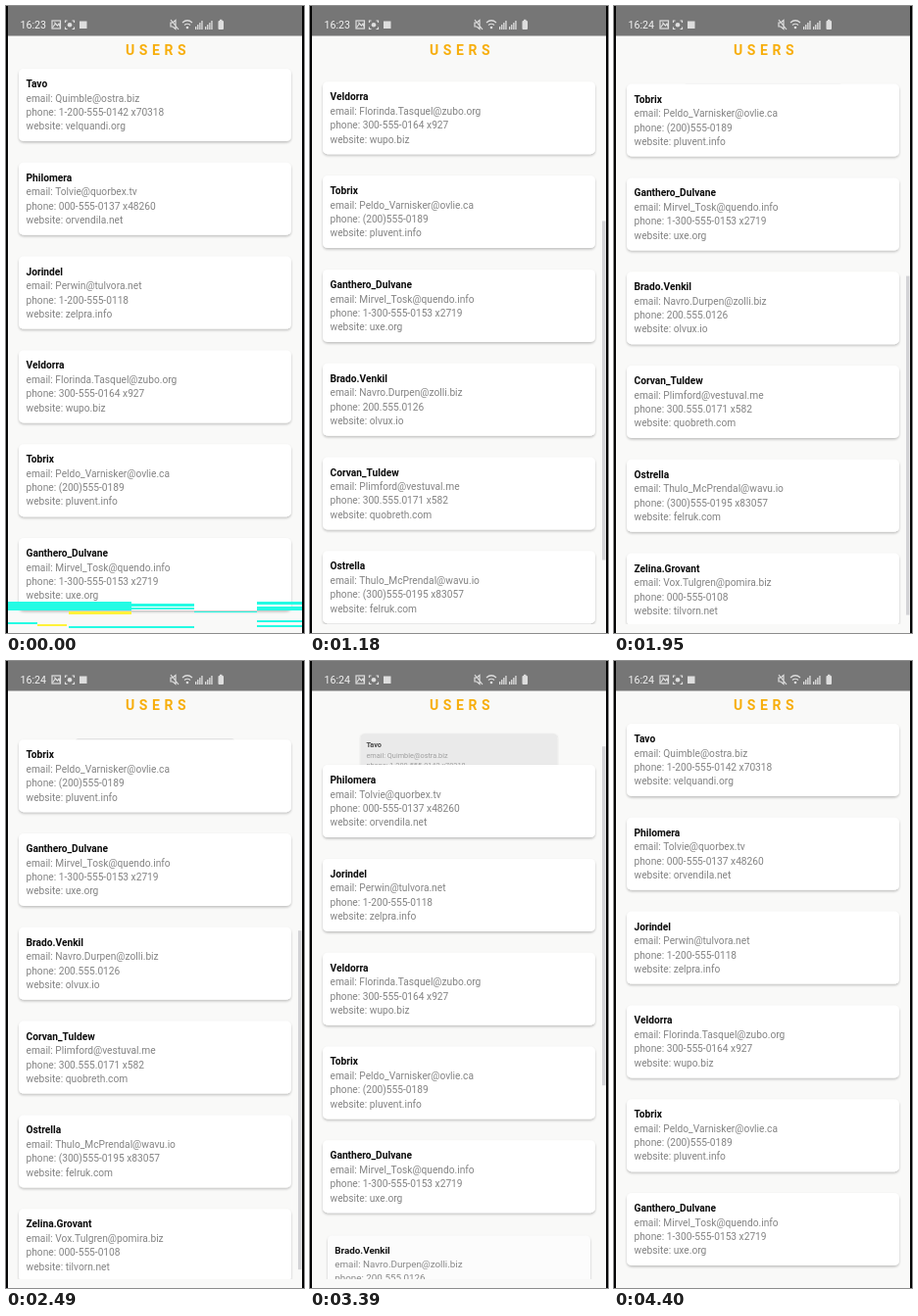
These frames come from a looping animation (304 by 640 pixels, 4430 ms). An HTML page:

```html
<!DOCTYPE html>
<html lang="en">
<head>
<meta charset="utf-8">
<title>Users</title>
<style>
  html, body { margin: 0; width: 100%; height: 100%; overflow: hidden; background: #f9f9f8; }
  svg { display: block; width: 100vw; height: 100vh; }
  text { font-family: Roboto, sans-serif; }
  .name { font-size: 10.2px; font-weight: 700; fill: #0b0b0b; }
  .info { font-size: 10.2px; fill: #838383; }
  .title { font-size: 14px; font-weight: 700; letter-spacing: 4.6px; fill: #f7ae0c; }
  .clock { font-size: 10.6px; fill: #f2f2f2; }
</style>
</head>
<body>
<svg viewBox="0 0 304 640" preserveAspectRatio="none">
  <defs>
    <filter id="shade" x="-5%" y="-10%" width="110%" height="130%">
      <feDropShadow dx="0" dy="1.5" stdDeviation="1.2" flood-color="#000" flood-opacity=".24"/>
    </filter>
    <clipPath id="list"><rect x="2" y="56" width="300" height="575"/></clipPath>
  </defs>
  <rect width="304" height="640" fill="#f9f9f8"/>
  <g id="cards" clip-path="url(#list)"></g>
  <rect id="thumb" x="298" width="3.5" height="346" fill="#d3d3d6"/>
  <text class="title" x="122" y="50">USERS</text>

  <rect width="304" height="30.5" fill="#767676"/>
  <text id="clock" class="clock" x="14.5" y="23"></text>
  <g fill="none" stroke="#dedede" stroke-width="1.2">
    <rect x="47" y="15" width="8.5" height="8"/>
    <path d="M47.5 22l3-4 2 2 1.500-2 1.500 4M49 17h1.500"/>
    <path d="M62.500 15h-2v2M67.500 15h2v2M62.500 23.500h-2v-2M67.500 23.500h2v-2"/>
    <path d="M168 17h2l3-2.500v9l-3-2.500h-2zM168 14l8 10"/>
    <path d="M180 17q5-4.500 10 0M182 19.500q3-2.500 6 0"/>
  </g>
  <g fill="#dedede">
    <circle cx="65" cy="19.200" r="2.300"/>
    <rect x="75" y="15.500" width="7.500" height="7.500"/>
    <circle cx="185" cy="22" r="1.300"/>
    <g id="bars"></g>
    <rect x="216.500" y="15" width="5.500" height="9" rx="1"/>
    <rect x="218" y="13.800" width="2.500" height="2"/>
  </g>
  <g id="glitch">
    <path fill="#25fbe4" d="M0 608h128v9H0zM128 610h64v3h-64zM128 614h64v2h-64zM192 618h64v1h-64zM256 608h48v3h-48zM256 613h48v4h-48zM0 629h32v2H0zM64 633h128v2H64zM256 627h48v2h-48zM256 632h48v2h-48z"/>
    <path fill="#fff23a" d="M64 618h64v3H64zM32 631h30v2H32z"/>
  </g>
  <path d="M0 0h2v640H0zM302 0h2v640h-2z" fill="#050505"/>
</svg>
<script>
const LOOP = 4430, PITCH = 95.8, TOP = 101, BOTTOM = 615.2;
const users = [
  ["Tavo", "Quimble@ostra.biz", "1-200-555-0142 x70318", "velquandi.org"],
  ["Philomera", "Tolvie@quorbex.tv", "000-555-0137 x48260", "orvendila.net"],
  ["Jorindel", "Perwin@tulvora.net", "1-200-555-0118", "zelpra.info"],
  ["Veldorra", "Florinda.Tasquel@zubo.org", "300-555-0164 x927", "wupo.biz"],
  ["Tobrix", "Peldo_Varnisker@ovlie.ca", "(200)555-0189", "pluvent.info"],
  ["Ganthero_Dulvane", "Mirvel_Tosk@quendo.info", "1-300-555-0153 x2719", "uxe.org"],
  ["Brado.Venkil", "Navro.Durpen@zolli.biz", "200.555.0126", "olvux.io"],
  ["Corvan_Tuldew", "Plimford@vestuval.me", "300.555.0171 x582", "quobreth.com"],
  ["Ostrella", "Thulo_McPrendal@wavu.io", "(300)555-0195 x83057", "felruk.com"],
  ["Zelina.Grovant", "Vox.Tulgren@pomira.biz", "000-555-0108", "tilvorn.net"]
];
// Each swipe slows to a stop: distances add up to zero over the loop
const swipes = [
  { start: 710, length: 765, by: 290.6, power: 3 },
  { start: 1700, length: 520, by: 89.4, power: 3 },
  { start: 2470, length: 1060, by: -332, power: 2 },
  { start: 3440, length: 400, by: -48, power: 2 }
];

const $ = id => document.getElementById(id);
const clamp = (v, lo, hi) => Math.min(hi, Math.max(lo, v));

function add(parent, tag, attrs, text) {
  const el = document.createElementNS("http://www.w3.org/2000/svg", tag);
  for (const k in attrs) el.setAttribute(k, attrs[k]);
  if (text) el.textContent = text;
  return parent.appendChild(el);
}

// Cards are drawn around their own centre
const cards = users.map(([name, email, phone, site]) => {
  const g = add($("cards"), "g", {});
  const box = add(g, "rect", { x: -139, y: -37, width: 278, height: 74, rx: 5, filter: "url(#shade)" });
  const words = add(g, "g", {});
  add(words, "text", { x: -131.5, y: -18, class: "name" }, name);
  ["email: " + email, "phone: " + phone, "website: " + site].forEach((line, i) =>
    add(words, "text", { x: -131.5, y: -3.4 + 14.35 * i, class: "info" }, line));
  return { g, box, words };
});

for (const x of [193, 203])
  for (let i = 0; i < 4; i++)
    add($("bars"), "rect", { x: x + i * 2.1, y: 21 - i * 2, width: 1.3, height: 3 + i * 2 });

function scrollAt(t) {
  return swipes.reduce((sum, { start, length, by, power }) => {
    const left = 1 - clamp((t - start) / length, 0, 1);
    return sum + by * (1 - left ** power);
  }, 0);
}

function grey(level) {
  const v = Math.round(level);
  return `rgb(${v},${v},${v})`;
}

function draw(t) {
  const scroll = scrollAt(t);
  cards.forEach(({ g, box, words }, i) => {
    const y = TOP + i * PITCH - scroll;
    const past = Math.max(TOP - y, y - BOTTOM, 0);
    const s = clamp(1 - past / (2 * PITCH), 0.5, 1);
    g.setAttribute("transform", `translate(152 ${Math.max(y, TOP).toFixed(2)}) scale(${s.toFixed(4)})`);
    box.setAttribute("fill", grey(255 - 76 * (1 - s)));
    words.setAttribute("opacity", s);
  });
  $("thumb").setAttribute("y", 55 + scroll * 0.6);
  $("thumb").setAttribute("opacity", clamp((t - 710) / 80, 0, 1) * clamp((4300 - t) / 200, 0, 1));
  $("clock").textContent = t < 1240 ? "16:23" : "16:24";
  $("glitch").setAttribute("visibility", t < 30 ? "visible" : "hidden");
}

const start = performance.now();
function tick() {
  draw((performance.now() - start) % LOOP);
  requestAnimationFrame(tick);
}
draw(0);
requestAnimationFrame(tick);
</script>
</body>
</html>
```
